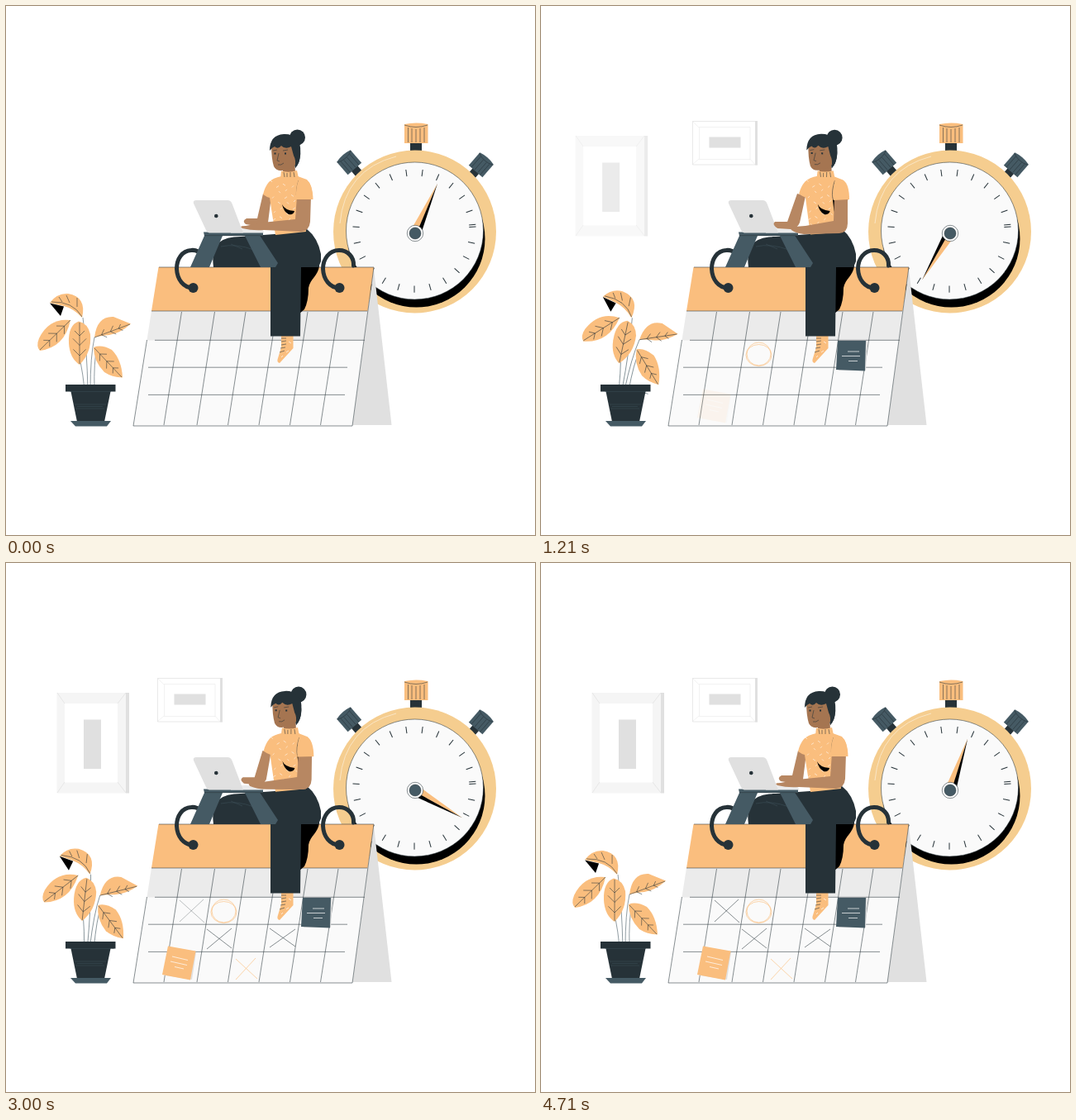
Write an HTML page that moves like this. It is 640x640 px and loops after 4.78 s.

```html
<!DOCTYPE html>
<html lang="en">
<head>
<meta charset="utf-8">
<title>Planning time</title>
<style>
html, body { margin: 0; width: 100%; height: 100%; overflow: hidden; background: #fff; }
svg { display: block; width: 100vw; height: 100vh; }
path, circle, ellipse { fill: none; }
.or { fill: #fabe7e; }
.rim { fill: #f5cd8f; }
.dk { fill: #263238; }
.sl { fill: #455a64; }
.bk { fill: #000; }
.wh { fill: #fff; }
.pale { fill: #fafafa; }
.g1 { fill: #f5f5f5; }
.g2 { fill: #ebebeb; }
.g3 { fill: #e0e0e0; }
.arm { fill: #b78762; }
.face { fill: #a57551; }
.ln { stroke: #263238; stroke-width: .55; }
.lo { stroke: #fabe7e; stroke-width: .65; }
.lg { stroke: #e0e0e0; stroke-width: .7; }
.lw { stroke: #fff; stroke-width: .7; }
.ls { stroke: #455a64; stroke-width: .6; }
.ring { stroke: #263238; stroke-width: 5; stroke-linecap: round; }
</style>
</head>
<body>
<svg viewBox="0 0 640 640">
  <g id="picA">
    <path class="wh lg" d="M183.5 139.5H261.5V192H183.5Z"/>
    <path class="g3" d="M259 139H262V192.500H259Z"/>
    <path class="lg" opacity=".6" d="M191.500 146.500H253V185.500H191.500ZM183 139L191 147M183 192L191 185M259 192L253 185"/>
    <path class="g3" d="M203.500 158.500H241.500V171.500H203.500Z"/>
  </g>
  <g id="picB">
    <path class="g1" d="M61.500 157H145.500V278.500H61.500Z"/>
    <path class="g3" d="M145 157H149V278.500H145Z"/>
    <path class="wh" d="M71 170H135V265.500H71Z"/>
    <path class="lg" d="M62 157L71 170M145 157L135 170M62 278L71 265M145 278L135 265"/>
    <path class="g3" d="M94 189.500H115V249H94Z"/>
  </g>

  <g id="clock">
    <path class="dk" d="M489 165H503V176H489Z"/>
    <path class="or" d="M482 143Q496 140 510.500 143V166H482Z"/>
    <path class="ln" d="M482 144Q496 149 510 144M486.500 147V165M491 148V165M496 149V165M501 148V165M506 147V165"/>
    <g id="knob" transform="translate(415 189) rotate(-41)">
      <path class="dk" d="M-5 9H5V21H-5Z"/>
      <path class="sl" d="M-11 -10Q0 -13 11 -10V10.500H-11Z"/>
      <path class="ln" d="M-11 -9Q0 -4 11 -9M-7 -7V10M-3 -6V10M2 -6V10M7 -7V10"/>
    </g>
    <use href="#knob" transform="matrix(-1 0 0 1 990 3)"/>
    <circle class="rim" cx="494.500" cy="273" r="98.500"/>
    <path d="M404 263Q410 198 472 182" stroke="#fae5c4"/>
    <circle class="bk" cx="496.500" cy="281.500" r="83"/>
    <circle class="pale ln" cx="494.500" cy="272" r="83"/>
    <g id="ticks"></g>
    <g id="hand">
      <path class="or" d="M0 -66L-6.500 0H2Z"/>
      <path class="bk" d="M0 -66L7 0H1.500Z"/>
    </g>
    <circle class="wh ln" cx="495" cy="275" r="9.700"/>
    <circle class="sl ln" cx="495" cy="275" r="7"/>
  </g>

  <g id="calendar">
    <path class="g3" d="M445 318L466.500 507H419Z"/>
    <path class="pale" d="M176 369H438L419 508H154Z"/>
    <path class="g2" d="M176 369H438L432.500 404.500H170.500Z"/>
    <path class="or" d="M184.500 316H445L437.500 369H176Z"/>
    <path class="ln" d="M445 316L419 508H154L170.500 404M185 316H445M176 369H437M180 404.300H434M172 437.200H413M172 470.400H410"/>
    <path class="ln" id="columns"/>
  </g>
  <g id="marks">
    <g id="loop"><ellipse class="lo" cx="263.500" cy="421" rx="14.500" ry="14"/><ellipse class="lo" cx="263.500" cy="422.500" rx="15.500" ry="13"/></g>
    <g id="noteA">
      <path class="g3" d="M361 405H395L393 441H360Z"/>
      <path class="sl" d="M359 405H393L392 441.500L357 440Z"/>
      <path class="lw" d="M371 418H385M364 423.500H386M372 429.500H383"/>
    </g>
    <g id="noteB">
      <path class="g3" d="M198 465L230 471L225 504L192 499Z"/>
      <path class="or" d="M196 463.500L229.500 469.500L223 504.500L189 498Z"/>
      <path class="lw" d="M201 476L220 480.500M199 482L219 486.500M204 488.500L215 491"/>
    </g>
    <path id="x1" class="lo" d="M278 479L304 503M302 478L278 504"/>
    <path id="x2" class="ln" d="M319 442L350 464M350 443L319 465"/>
    <path id="x3" class="ln" d="M243 443L273 466M273 442L243 467"/>
    <path id="x4" class="ln" d="M210 408L240 435M239 407L210 434"/>
  </g>

  <g id="rings">
    <path class="ring" d="M420.500 314C421 303 413 295.500 403 295.500C391 295.500 383.500 306 383.500 318C384 331 392 341 403 341"/>
    <path class="ring" d="M237 301C233 296 228 295 224 295.500C213 296 206.500 306 206.500 318C207 331 215 341 226 341"/>
    <circle class="dk" cx="403.500" cy="341" r="6"/>
    <circle class="dk" cx="226.500" cy="341" r="6"/>
  </g>

  <g id="legs">
    <path class="or" d="M333 398H347.500V414L331 432Q327 431 329 426L333 413Z"/>
    <path class="ln" d="M333 402H339M333 406L339 405M333 410L339 409M332 414L338 413M331 419L337 417"/>
    <path class="lw" d="M342 406L345 408M339 419L342 417M333 425L335 423"/>
    <path class="bk" d="M350 314H379C378 326 368 330 366 341Q366 357 361 367L355 372Z"/>
    <path class="dk" d="M251 316Q248 294 258 286Q266 279 284 279L325 276L364 270Q377 280 381 300V309L378 316H357L356 399.500H320V316Z"/>
    <path class="ls" d="M260 291Q278 287 300 295M272 288L286 294" opacity=".7"/>
  </g>

  <g id="desk">
    <path class="sl" d="M239 273.500H311V277.500H307L329 311L326 316H308L289 278H262L246 316H223L240 278Z"/>
    <path class="ln" d="M240 277.700H309"/>
    <path class="g2" d="M272 269H308Q312 271 312 274.500H272Z"/>
    <path class="g3" d="M230 235H268Q272 235 273.500 239L287 274.500H246Q243 274 241.500 270L227 239Q226 235 230 235Z"/>
    <circle class="dk" cx="254.300" cy="254" r="2.300"/>
  </g>

  <path id="farArm" class="arm"/>
  <g id="body">
    <path class="or" d="M333 206Q323 208 318 213Q313 219 311 228Q315 231 319 232Q322 252 326 277L363 273L358 234H371Q371 216 364 210L353 206Z"/>
    <path class="face" d="M335 189L349 184L350 201Q342 207 335 200Z"/>
    <path class="or" d="M333 199.500Q342 202 352 199L354 208Q342 211 332 208Z"/>
    <path class="ln" d="M336 201L337 207M340 202V207M344 201V207M348 201L349 207"/>
    <path class="lw" id="flecks" opacity=".8"/>
    <path class="ln" d="M354 211Q350 224 352 233H371"/>
    <path class="bk" d="M334 240Q337 247 349 248Q348 253 342 252Q336 249 334 240ZM352 234H356L354 249Z"/>
    <path class="dk" d="M343 164H355Q358 180 354 190L350 196Z"/>
    <path class="face" d="M321 168Q321 184 324 194Q327 200 334 199Q344 198 350 192L351 176L344 165H324Z"/>
    <circle class="dk" cx="352.500" cy="159" r="9.500"/>
    <path class="dk" d="M319 175Q319 156 336 155Q355 154 356 177Q356 190 350 196Q351 186 348 181L345 170Q338 174 333 169Q329 174 325 170Q322 171 319 175Z"/>
    <path class="ln" d="M330 178L328 187L331 188M329 192Q333 193 336 190M323 175L328 174M335 175L341 174"/>
    <path class="dk" d="M324.500 177.500h2v2h-2ZM337 177.500h2v2h-2Z"/>
  </g>
  <path id="nearArm" class="arm"/>
  <path id="sleeve" class="or"/>

  <g id="plant">
    <path class="ls" d="M95 464Q93 445 90 430M99 466Q98 415 93 377M102 465Q102 424 107 401M107 465Q106 430 110 414M115 462L131 463"/>
    <path class="or" d="M53 359Q62 347 75 348Q98 352 92 377Q82 366 70 363Z"/>
    <path class="bk" d="M53 359.500L70 363.500L66 375Z"/>
    <path class="or" d="M78 380Q52 377 40 402Q36 412 41 417Q71 413 78 380Z"/>
    <path class="or" d="M107 401Q110 375 130 376L151 384.500Q138 396 125 398Q114 399 107 401Z"/>
    <path class="or" d="M106 413Q106 430 119 443Q128 449 141 449.500Q140 428 128 416Q115 409 106 413Z"/>
    <path class="or" d="M88 381.500Q75 386 76 408Q77 426 89 434Q104 419 102 397Q99 384 88 381.500Z"/>
    <path class="ln" id="veins"/>
  </g>
  <g id="pot">
    <path class="dk" d="M78 464H127L119 503H86Z"/>
    <path class="dk" d="M72 458H132.500V466.500H72Z"/>
    <path class="sl" d="M78 502H127L122 508.500H84Z"/>
    <path class="ls" d="M77 466.500H127M83 482H121M86 484.500H117M84 487H119" opacity=".6"/>
  </g>
</svg>
<script>
const $ = id => document.getElementById(id);
const LOOP = 4780, FPS = 14;
const clamp = v => Math.min(1, Math.max(0, v));

// Static details built by rule
const angles = Array.from({ length: 23 }, (_, i) => 180 + i * 360 / 23).concat(84);
$('ticks').innerHTML = angles.map(a =>
  `<path d="M494 197.300V205.500" stroke="#263238" transform="rotate(${a} 494 272)"/>`).join('');

$('columns').setAttribute('d', [191, 231, 268.5, 306, 343.5, 380.5]
  .map(x => `M${x + 21.5} 370L${x} 507`).join(''));

let flecks = '';
for (let i = 0; i < 26; i++) {
  const x = 322 + (i * 13) % 34, y = 213 + i * 2.2;
  flecks += `M${x} ${y}l${i % 2 ? 3 : -2} ${i % 3 ? 2 : -2}`;
}
$('flecks').setAttribute('d', flecks);

// Midrib with paired side veins, from base to tip
function vein(x, y, tx, ty, w) {
  let d = `M${x} ${y}L${tx} ${ty}`;
  const dx = tx - x, dy = ty - y, len = Math.hypot(dx, dy);
  for (const k of [.2, .45, .68]) {
    const s = w * (1 - Math.abs(k - .35));
    for (const side of [-1, 1]) {
      const vx = (dx - dy * side) / len * s, vy = (dy + dx * side) / len * s;
      d += `M${x + dx * k} ${y + dy * k}l${vx} ${vy}`;
    }
  }
  return d;
}
$('veins').setAttribute('d',
  vein(78, 380, 41, 416, 8) + vein(89, 433, 89, 383, 9) + vein(107, 401, 150, 385, 6) +
  vein(107, 414, 140, 449, 7) + 'M92 376Q81 357 55 358M86 364L86 353M77 359L73 350M68 358L64 352');

// Blend two paths with the same structure
function mix(a, b, k) {
  const to = b.match(/[\d.]+/g);
  let i = 0;
  return a.replace(/[\d.]+/g, v => +v + (to[i++] - v) * k);
}
const poses = {
  farArm: [
    'M311 227L321 230L317 262Q312 268 302 266L290 264Q285 260 291 257L304 257Z',
    'M310 227L320 230L313 262Q310 270 302 270L286 269Q279 264 283 261L298 261Z'],
  nearArm: [
    'M352 230L369 230L368 261Q367 272 357 273L312 271Q298 272 286 269Q281 266 290 266L310 262L350 258Z',
    'M355 230L371 230L371 263Q371 274 361 275L318 276Q308 275 303 271Q299 266 307 267L320 266L354 260Z'],
  sleeve: [
    'M354 210Q350 222 351 234L371.5 234Q371 216 364 211Z',
    'M356 210Q353 222 354 235L373 234Q373 216 366 211Z']
};

const fades = { loop: 0, noteA: .6, noteB: 1.19, x1: 1.25, x2: 1.9, x3: 2.3, x4: 2.75 };
const enter = (t, start) => clamp((t - start) / .5);

function slide(id, k, dx, dy) {
  $(id).setAttribute('opacity', clamp(k * 1.3));
  $(id).setAttribute('transform', `translate(${dx * (1 - k)} ${dy * (1 - k)})`);
}

function draw(t) {
  const sway = (1 - Math.cos(t / 2.39 * 2 * Math.PI)) / 2;
  $('hand').setAttribute('transform', `translate(495 275) rotate(${24.2 + 150.8 * t})`);
  $('plant').setAttribute('transform', `rotate(${12 * sway} 100 460)`);
  $('body').setAttribute('transform', `rotate(${1.3 * sway} 345 275)`);
  for (const id in poses) $(id).setAttribute('d', mix(...poses[id], sway));
  for (const id in fades) $(id).setAttribute('opacity', enter(t, fades[id]));
  slide('picA', enter(t, .27), 0, -38);
  slide('picB', enter(t, 1), -38, 0);
}

// Motion advances in 14 steps a second
const begin = performance.now();
function tick() {
  const ms = (performance.now() - begin) % LOOP;
  const step = Math.floor((ms + 5) * FPS / 1000);
  draw(step ? step / FPS + .024 : 0);
  requestAnimationFrame(tick);
}
tick();
</script>
</body>
</html>
```
